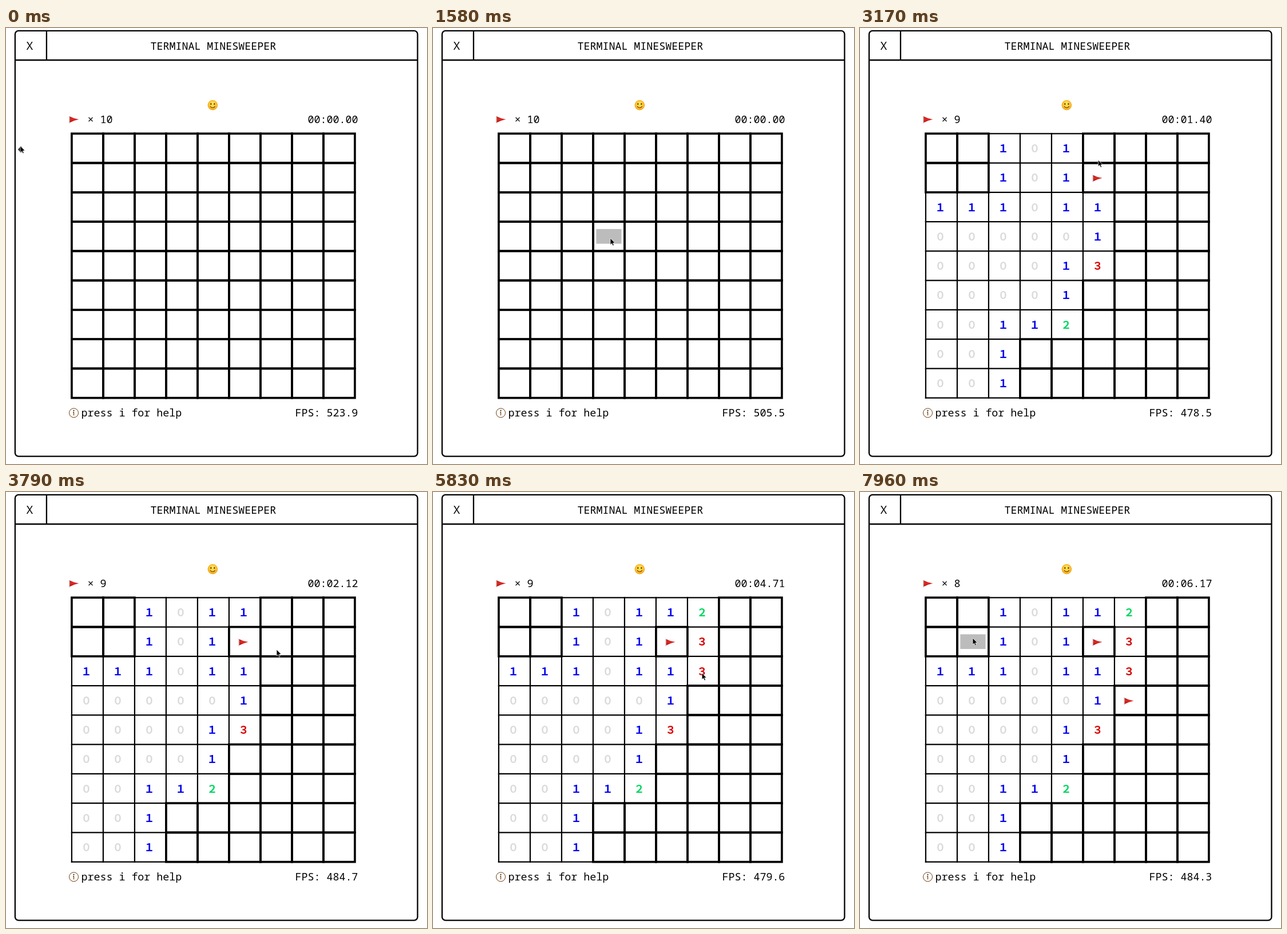
These frames come from a looping animation (736 by 761 pixels, 8000 ms). An HTML page with a canvas:

```html
<!DOCTYPE html>
<html lang="en">
<head>
<meta charset="utf-8">
<title>Terminal Minesweeper</title>
<style>
html, body { margin: 0; width: 100%; height: 100%; overflow: hidden; background: #fff; }
canvas { display: block; }
</style>
</head>
<body>
<canvas id="stage" width="736" height="761"></canvas>
<script>
const ctx = document.getElementById('stage').getContext('2d');
const LOOP = 8000, COL = 11, ROW = 25.63;
const LEFT = 114.9, TOP = 184.3, CELL_W = 5 * COL, CELL_H = 2 * ROW;
const MONO = '18.33px "Noto Sans Mono", monospace';
const WIDE = '18.33px "Noto Sans CJK JP", "Noto Sans CJK SC", sans-serif';
const DIGIT_COLORS = ['#dadada', '#0000f0', '#00d75f', '#d70000'];

// F is a flag, a dot stays closed
const BOARD = [
  '..10112..',
  '..101F3..',
  '1110113..',
  '000001F..',
  '000013...',
  '00001....',
  '00112....',
  '001......',
  '001......'
];
const START = 1770;
const MOVES = { '5,1': 2960, '5,0': 3400, '6,0': 4200, '6,1': 4700, '6,2': 5750, '6,3': 6710 };
const PRESSES = [3400, 4200, 4700, 5750];

const MOUSE = [
  [0, 25, 206], [420, 110, 104], [830, 240, 300], [1000, 296, 355], [1210, 304, 362],
  [1580, 310, 367], [1900, 310, 367], [2040, 326, 354], [2330, 456, 268], [2380, 449, 275],
  [2420, 438, 285], [2700, 416, 264], [3000, 415, 263], [3250, 417, 215], [3600, 418, 216],
  [3750, 442, 265], [3790, 473, 275], [4050, 470, 215], [4250, 470, 215], [4550, 472, 264],
  [4750, 474, 265], [4960, 509, 318], [5500, 472, 315], [5850, 470, 316], [6300, 466, 364],
  [6710, 463, 374], [6750, 463, 393], [6790, 463, 398], [7500, 206, 276], [7960, 197, 255]
];
const ELAPSED = [[START, 0], [2420, 662], [3790, 2012], [4960, 3184], [6790, 5050], [7960, 6174]];
const FPS = [[0, 523.9], [1580, 505.5], [2420, 471], [3790, 484.7], [4960, 483.7], [6790, 475.1], [7960, 484.3]];

function lerp(keys, t, n = 1) {
  const i = keys.findIndex(k => k[0] > t);
  if (i < 0) return keys[keys.length - 1][n];
  if (i === 0) return keys[0][n];
  const a = keys[i - 1], b = keys[i];
  return a[n] + (b[n] - a[n]) * (t - a[0]) / (b[0] - a[0]);
}

// 24 steps a second, with two still stretches
function stepTime(t) {
  const s = Math.round(Math.floor((t + 4) * 0.024) * 12.5 / 3) * 10;
  for (const [from, to] of [[1000, 1210], [6500, 6710]])
    if (s >= from && s < to) return from;
  return s;
}

function text(str, x, y, font = MONO, color = '#000') {
  ctx.font = font;
  ctx.fillStyle = color;
  ctx.fillText(str, x, y);
}

function line(width, ...pts) {
  ctx.lineWidth = width;
  ctx.beginPath();
  pts.forEach(([x, y]) => ctx.lineTo(x, y));
  ctx.stroke();
}

function ellipse(x, y, rx, ry, fill) {
  ctx.beginPath();
  ctx.ellipse(x, y, rx, ry, 0, 0, 7);
  ctx.fillStyle = fill;
  ctx.fill();
}

function polygon(x, y, pts, fill) {
  ctx.beginPath();
  pts.forEach(([px, py]) => ctx.lineTo(x + px, y + py));
  ctx.closePath();
  ctx.fillStyle = fill;
  ctx.fill();
}

function flag(x, y) {
  const red = ctx.createLinearGradient(x, y - 6, x, y + 6);
  red.addColorStop(0, '#b01818');
  red.addColorStop(0.45, '#e02a22');
  red.addColorStop(1, '#a80f12');
  polygon(x, y, [[1, -5.5], [8, -2.5], [17, -0.3], [9, 2], [1, 5.5]], red);
  ctx.fillStyle = '#b9a9a5';
  ctx.fillRect(x + 0.2, y - 6.3, 0.9, 13);
}

function face(x, y, surprised) {
  const skin = ctx.createRadialGradient(x, y - 3, 1, x, y, 9);
  skin.addColorStop(0, '#ffe65c');
  skin.addColorStop(0.65, '#fdc92f');
  skin.addColorStop(1, '#ee9a1c');
  ellipse(x, y, 8.8, 8.8, skin);
  const brown = '#6b3b0a';
  ellipse(x - 3, y - 2, 1.2, 1.6, brown);
  ellipse(x + 3, y - 2, 1.2, 1.6, brown);
  if (surprised) return ellipse(x, y + 4, 2.2, 2.8, brown);
  ctx.strokeStyle = brown;
  ctx.lineWidth = 1.2;
  ctx.beginPath();
  ctx.arc(x, y - 0.5, 5, 0.5, Math.PI - 0.5);
  ctx.stroke();
}

function infoIcon(x, y) {
  ctx.lineWidth = 1;
  ctx.beginPath();
  ctx.arc(x, y, 8, 0, 7);
  ctx.stroke();
  ellipse(x, y - 4, 1, 1, '#000');
  line(1.2, [x - 1.5, y - 1.2], [x, y - 1.2], [x, y + 4.5]);
}

function cursor(x, y, resizing) {
  const arrow = [[0, 0], [0, 11.3], [2.6, 9], [4.4, 13], [6.3, 12.2], [4.6, 8.3], [8, 8.1]];
  if (resizing) polygon(x - 4, y + 6, [[0, 0], [5, -6], [10, 0], [5, 6]], '#222');
  polygon(x, y, arrow, '#000');
  ctx.strokeStyle = '#fff';
  ctx.lineWidth = 0.7;
  ctx.stroke();
  ctx.strokeStyle = '#000';
}

function frame() {
  ctx.strokeStyle = '#000';
  ctx.lineWidth = 2.3;
  ctx.beginPath();
  ctx.roundRect(15.9, 4.9, 64 * COL - 0.4, 29 * ROW - 0.5, 6);
  ctx.stroke();
  line(2.3, [15.9, 56], [719.5, 56]);
  line(2.3, [70.9, 4.9], [70.9, 56]);
  text('Ｘ', 32.2, 37.5, WIDE);
  text('TERMINAL MINESWEEPER', 252.4, 37.5);
}

const pad = n => String(n).padStart(2, '0');

function clock(t) {
  const ms = Math.round(lerp(ELAPSED, t)), sec = Math.floor(ms / 1000);
  // the fraction is the first two digits of the unpadded milliseconds
  return `00:${pad(sec)}.${String(ms % 1000).slice(0, 2).padEnd(2, '0')}`;
}

function board(t) {
  const isOpen = (c, r) => BOARD[r][c] !== '.' && t >= (MOVES[c + ',' + r] || START);
  // the highlight trails the pointer by one step
  const seen = Math.max(0, t - 40);
  const hoverCol = Math.floor((lerp(MOUSE, seen, 1) - LEFT) / CELL_W);
  const hoverRow = Math.floor((lerp(MOUSE, seen, 2) - TOP) / CELL_H);
  let flags = 0;

  for (let i = 0; i <= 9; i++) {
    const x = LEFT + i * CELL_W, y = TOP + i * CELL_H;
    line(2.2, [x, TOP - 1.1], [x, TOP + 9 * CELL_H + 1.1]);
    line(2.2, [LEFT - 1.1, y], [LEFT + 9 * CELL_W + 1.1, y]);
  }
  for (let r = 0; r < 9; r++) for (let c = 0; c < 9; c++) {
    const x = LEFT + c * CELL_W, y = TOP + r * CELL_H;
    const value = BOARD[r][c], open = isOpen(c, r);
    if (open && value !== 'F') {
      const digit = String.fromCharCode(0xff10 + +value);
      text(digit, x + 16.4, y + 32.7, 'bold ' + WIDE, DIGIT_COLORS[value]);
      continue;
    }
    ctx.lineWidth = 3.7;
    ctx.strokeRect(x, y, CELL_W, CELL_H);
    if (open) {
      flag(x + 16.5, y + 26.6);
      flags++;
    } else if (c === hoverCol && r === hoverRow) {
      ctx.fillStyle = '#bcbcbc';
      ctx.fillRect(x + COL / 2, y + ROW / 2, 4 * COL, ROW);
    }
  }
  return flags;
}

function draw(now) {
  const t = stepTime(now % LOOP);
  ctx.fillStyle = '#fff';
  ctx.fillRect(0, 0, 736, 761);
  frame();
  const flags = board(t);
  face(361.3, 134.6, PRESSES.some(p => t >= p - 150 && t < p));
  flag(110.2, 159.8);
  text('× ' + (10 - flags), 142.4, 165.7);
  text(clock(t), 527.4, 165.7);
  infoIcon(118.5, 671.8);
  text('press i for help', 131.4, 678.3);
  text('FPS: ' + lerp(FPS, t).toFixed(1), 505.4, 678.3);
  cursor(lerp(MOUSE, t, 1), lerp(MOUSE, t, 2), t < 40);
  requestAnimationFrame(draw);
}
requestAnimationFrame(draw);
</script>
</body>
</html>
```
